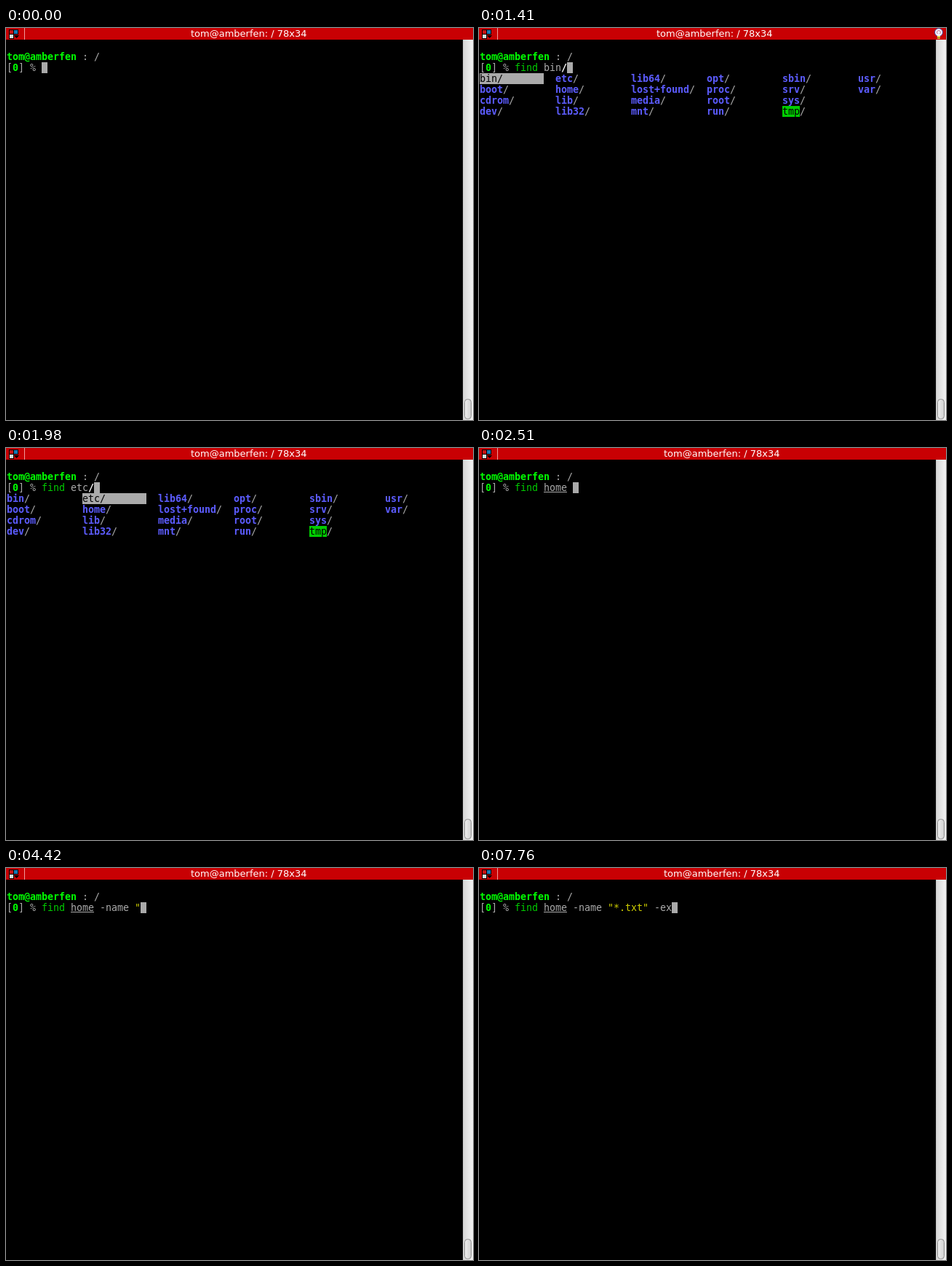
An HTML page with a canvas for the animation above (8000 ms loop, 642x538 px).

```html
<!DOCTYPE html>
<html lang="en">
<head>
<meta charset="utf-8">
<title>Terminal</title>
<style>
html, body { margin: 0; width: 100%; height: 100%; overflow: hidden; background: #000; }
canvas { display: block; }
</style>
</head>
<body>
<canvas id="stage" width="642" height="538"></canvas>
<script>
const ctx = document.getElementById('stage').getContext('2d');
const LOOP = 8000, CELL = 8, LINE = 15, LEFT = 1, TOP = 17;
const USER = 'tom@amberfen';
const GREY = '#aaaaaa', GREEN = '#00cd00', LIME = '#00ff00', BLUE = '#5c5cff',
      YELLOW = '#cdcd00', RED = '#ff0000', WHITE = '#ffffff', BLACK = '#000000';
const MONO = '13.333px "DejaVu Sans Mono", monospace';
const SANS = '13px "DejaVu Sans", sans-serif';

const DIRS = ('bin boot cdrom dev etc home lib lib32 lib64 lost+found media ' +
  'mnt opt proc root run sbin srv sys tmp usr var').split(' ');
const BELL_ON = 900, BELL_OFF = 1900, MENU_ON = 950, MENU_OFF = 2510;

// [time, text on the command line]
const TYPED = [
  [0, ''], [300, 'f'], [390, 'fi'], [550, 'fin'], [650, 'find'], [780, 'find '],
  [2510, 'find home '], [2900, 'find home -'], [3190, 'find home -n'],
  [3310, 'find home -na'], [3460, 'find home -nam'], [3590, 'find home -name '],
  [4420, 'find home -name "'], [4800, 'find home -name "*'],
  [5090, 'find home -name "*.'], [5530, 'find home -name "*.t'],
  [5780, 'find home -name "*.tx'], [6030, 'find home -name "*.txt'],
  [6720, 'find home -name "*.txt"'], [7170, 'find home -name "*.txt" '],
  [7370, 'find home -name "*.txt" -'], [7490, 'find home -name "*.txt" -e'],
  [7760, 'find home -name "*.txt" -ex']
];

// [time, index of the highlighted directory]
const PICKS = [[0, -1], [1410, 0], [1540, 1], [1700, 2], [1840, 3], [1980, 4], [2320, 5], [2510, -1]];

const at = (list, t) => list.filter(step => step[0] <= t).pop()[1];

function rect(x, y, w, h, color) {
  ctx.fillStyle = color;
  ctx.fillRect(x, y, w, h);
}

function block(col, row, n, color) {
  rect(LEFT + col * CELL, TOP + row * LINE, n * CELL, LINE, color);
}

// Writes on the character grid and returns the next column.
function put(col, row, text, color, bold) {
  ctx.font = (bold ? 'bold ' : '') + MONO;
  ctx.fillStyle = color;
  for (const ch of text) ctx.fillText(ch, LEFT + CELL * col++, TOP + row * LINE + 12);
  return col;
}

function drawBulb() {
  ctx.beginPath();
  ctx.arc(632, 6, 5.5, 0, Math.PI * 2);
  ctx.fillStyle = '#f4f2ff';
  ctx.fill();
  ctx.lineWidth = 1;
  ctx.strokeStyle = '#3c3c90';
  ctx.stroke();
  ctx.beginPath();
  ctx.arc(632, 6, 2.5, 0, Math.PI * 2);
  ctx.strokeStyle = '#c07890';
  ctx.stroke();
  rect(630, 8, 4, 3, '#f4f2ff');
  rect(630, 11, 4, 4, '#e8d040');
  rect(630, 13, 4, 1, '#806820');
}

function drawTitle(bell) {
  rect(0, 0, 642, 16, '#c80003');
  rect(4, 2, 7, 7, BLACK);
  rect(10, 2, 7, 7, BLACK);
  rect(4, 8, 7, 7, BLACK);
  rect(5, 3, 5, 5, '#c81414');
  rect(11, 3, 5, 5, '#1478b4');
  rect(5, 9, 5, 5, '#d8e0dc');
  ctx.fillStyle = BLACK;
  ctx.beginPath();
  ctx.moveTo(11, 10);
  ctx.lineTo(18, 10);
  ctx.lineTo(14.5, 14);
  ctx.fill();
  rect(25, 0, 1, 16, '#ee9a9a');
  const title = USER + ': / 78x34';
  ctx.font = SANS;
  ctx.fillStyle = WHITE;
  ctx.fillText(title, Math.round((bell ? 323.5 : 333.5) - ctx.measureText(title).width / 2), 12);
  if (bell) drawBulb();
}

function drawScrollbar() {
  const track = ctx.createLinearGradient(628, 0, 642, 0);
  track.addColorStop(0, '#d6d6d6');
  track.addColorStop(1, '#f4f4f4');
  rect(628, 16, 14, 522, track);
  rect(628, 16, 1, 522, '#c0c0c0');
  const thumb = ctx.createLinearGradient(630, 0, 640, 0);
  thumb.addColorStop(0, '#f0f0f0');
  thumb.addColorStop(1, '#d0d0d0');
  ctx.beginPath();
  ctx.roundRect(630.5, 509.5, 9, 27, 4);
  ctx.fillStyle = thumb;
  ctx.fill();
  ctx.lineWidth = 1;
  ctx.strokeStyle = '#8c8c8c';
  ctx.stroke();
}

function drawCommand(col, text) {
  const first = text.split(' ')[0];
  if (first === 'find') put(col, 2, first, GREEN);
  else if (first === 'fi') put(col, 2, first, YELLOW);
  else put(col, 2, first, RED, true);
  let quoted = false;
  for (let i = first.length; i < text.length; i++) {
    const mark = text[i] === '"';
    put(col + i, 2, text[i], quoted || mark ? YELLOW : GREY);
    if (mark) quoted = !quoted;
  }
  if (text.includes('home')) rect(LEFT + (col + 5) * CELL, 60, 4 * CELL, 1, GREY);
  return col + text.length;
}

function drawMenu(pick) {
  DIRS.forEach((dir, i) => {
    const col = Math.floor(i / 4) * 13, row = 3 + i % 4;
    if (i === pick) {
      block(col, row, 11, GREY);
      put(col, row, dir + '/', BLACK);
      return;
    }
    const sticky = dir === 'tmp';
    if (sticky) block(col, row, dir.length, GREEN);
    const end = put(col, row, dir, sticky ? BLACK : BLUE, !sticky);
    put(end, row, '/', GREY);
  });
}

function draw(t) {
  rect(0, 0, 642, 538, BLACK);
  drawTitle(t >= BELL_ON && t < BELL_OFF);
  drawScrollbar();

  put(put(0, 1, USER, LIME, true), 1, ' : /', GREY);
  let col = put(0, 2, '[', GREY);
  col = put(col, 2, '0', LIME, true);
  col = put(col, 2, '] % ', GREY);
  col = drawCommand(col, at(TYPED, t));

  const pick = at(PICKS, t);
  if (t >= MENU_ON && t < MENU_OFF) drawMenu(pick);
  if (pick >= 0) {
    col = put(col, 2, DIRS[pick], GREY);
    col = put(col, 2, '/', WHITE, true);
  }
  // the cursor hides while the quote key is being composed
  if (t < 4140 || t >= 4420) block(col, 2, 1, GREY);
}

const start = performance.now();
function tick() {
  draw((performance.now() - start) % LOOP);
  requestAnimationFrame(tick);
}
tick();
</script>
</body>
</html>
```
